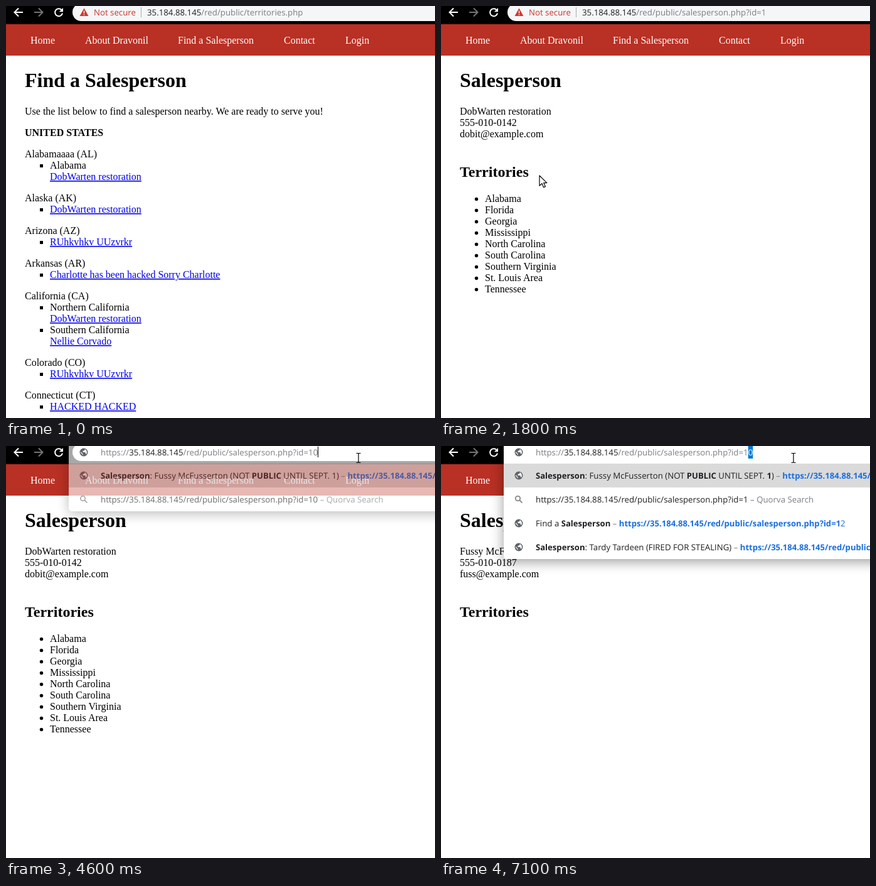
These frames come from a looping animation (684 px wide and 656 px high, 7.2 s). An HTML page:

```html
<!DOCTYPE html>
<html lang="en">
<head>
<meta charset="utf-8">
<title>Salesperson pages</title>
<style>
  html, body { margin: 0; width: 100%; height: 100%; overflow: hidden; background: #fff; }
  svg { display: block; width: 684px; height: 656px; }
  text { white-space: pre; }
  .page text { font: 16px "Liberation Serif", "Times New Roman", serif; }
  .page .h1 { font-size: 32px; font-weight: bold; }
  .page .h2 { font-size: 24px; font-weight: bold; }
  .page .b { font-weight: bold; }
  .page .link { fill: #00e; text-decoration: underline; }
  .ui text { font: 13.25px "Open Sans", "Noto Sans", sans-serif; fill: #202124; text-rendering: geometricPrecision; }
  .ui .b { font-size: 13.1px; font-weight: 700; }
  .ui .dim { fill: #7b7f84; }
  .ui .url { fill: #1a6fe0; }
  .ui .red { fill: #c8372d; }
  .ui .sel { fill: #fff; }
  #popup .panel { filter: drop-shadow(0 4px 10px rgba(0,0,0,.4)); }
</style>
</head>
<body>
<svg id="stage" viewBox="0 0 684 656"></svg>
<script>
const LOOP = 7200;
const HOST = "35.184.88.145";
const DIR = "/red/public/";
const SELLER = "DobWarten restoration";
const HIDDEN = "Fussy McFusserton";
const stage = document.getElementById("stage");

const text = (x, y, body, cls = "") => `<text x="${x}" y="${y}" class="${cls}">${body}</text>`;
const span = (cls, body) => `<tspan class="${cls}">${body}</tspan>`;
const group = (id, body, cls = "") => `<g id="${id}" class="${cls}">${body}</g>`;

// Page contents
const states = [
  ["Alabamaaaa (AL)", ["Alabama", SELLER]],
  ["Alaska (AK)", ["", SELLER]],
  ["Arizona (AZ)", ["", "RUhkvhkv UUzvrkr"]],
  ["Arkansas (AR)", ["", "Charlotte has been hacked Sorry Charlotte"]],
  ["California (CA)", ["Northern California", SELLER], ["Southern California", "Nellie Corvado"]],
  ["Colorado (CO)", ["", "RUhkvhkv UUzvrkr"]],
  ["Connecticut (CT)", ["", "HACKED HACKED"]]
];

const areas = ["Alabama", "Florida", "Georgia", "Mississippi", "North Carolina",
  "South Carolina", "Southern Virginia", "St. Louis Area", "Tennessee"];

function territories() {
  let out = text(30, 129, "Find a Salesperson", "h1")
    + text(30, 173, "Use the list below to find a salesperson nearby. We are ready to serve you!")
    + text(30, 207, "UNITED STATES", "b");
  let y = 241;
  for (const [state, ...regions] of states) {
    out += text(30, y, state);
    for (const [region, person] of regions) {
      y += 18;
      out += `<rect x="54" y="${y - 7}" width="5" height="5"/>`;
      if (region) {
        out += text(70, y, region);
        y += 18;
      }
      out += text(70, y, person, "link");
    }
    y += 34;
  }
  return out;
}

function profile(name, phone, mail, list) {
  return text(30, 129, "Salesperson", "h1")
    + [name, phone, mail].map((line, i) => text(30, 173 + 18 * i, line)).join("")
    + text(30, 272, "Territories", "h2")
    + list.map((area, i) => {
        const y = 312 + 18 * i;
        return `<circle cx="56.5" cy="${y - 4.5}" r="2.7"/>` + text(70, y, area);
      }).join("");
}

const nav = `<rect y="29" width="684" height="50" fill="#b93024"/><g fill="#fff">`
  + [[39, "Home"], [126, "About Dravonil"], [274, "Find a Salesperson"], [443, "Contact"], [541, "Login"]]
      .map(([x, label]) => text(x, 60, label)).join("") + "</g>";

// Browser parts
const arrow = (x, dir, color) =>
  `<path d="M${x + 7 * dir} 10H${x - 6.5 * dir}M${x} 3.5L${x - 6.5 * dir} 10L${x} 16.5"
    fill="none" stroke="${color}" stroke-width="2"/>`;

const toolbar = `<rect width="684" height="29"/>` + arrow(20, 1, "#fff") + arrow(52, -1, "#737373")
  + `<path d="M88.6 6.2A6 6 0 1 0 90 11.6" fill="none" stroke="#fff" stroke-width="2"/>
     <path d="M91 3V9.2H84.8Z" fill="#fff"/>`;

const globe = y => `<g transform="translate(124 ${y})"><circle r="6.5" fill="#5f6368"/>
  <path d="M-5-1L-1.4 2.4V5.2C-4-.1-5.6 2-5-1ZM1.5-5V-3.4L-1.5-2V0H2.2L3 2.6H4.6C5.7 0 5-3.6 1.5-5Z"
    fill="#f1f3f4"/></g>`;

const lens = `<g fill="none" stroke="#777" stroke-width="1.6"><circle cx="122.5" cy="83.5" r="3.7"/>
  <path d="M125.4 86.4L129.5 90.5"/></g>`;

const security = `<path d="M124.5 3.5L131.5 16H117.5Z" fill="#cf3a2f"/>
  <path d="M124.5 7.5V11.8M124.5 13V14.6" stroke="#fff" stroke-width="1.4"/>`
  + text(140, 15, "Not secure", "red") + `<path d="M215.5 2V18" stroke="#aaa"/>`;

const pill = `<rect id="field" x="106" y="-4" width="640" height="28" rx="14"/>`;

const fullUrl = page => `https://${HOST}${DIR}${page}`;
const sellerUrl = span("b url", fullUrl("salesperson.php?id=1"));
const dash = span("dim", " – ");

function rows(short) {
  const one = short ? span("b", "1") : "1";
  const first = globe(47)
    + text(151, 52, span("b", "Salesperson") + `: ${HIDDEN} (NOT ` + span("b", "PUBLIC") + ` UNTIL SEPT. ${one})`
      + dash + span("b url", fullUrl("salesperson.php?id=10")));
  const search = lens
    + text(151, 90, fullUrl(`salesperson.php?id=${short ? "1" : "10"}`) + dash + span("dim", "Quorva Search"));
  if (!short) return first + search;
  return first + search + globe(123) + globe(161)
    + text(151, 128, "Find a " + span("b", "Salesperson") + dash + sellerUrl + span("url", "2"))
    + text(151, 166, span("b", "Salesperson") + ": Tardy Tardeen (FIRED FOR STEALING)" + dash + sellerUrl);
}

const cursors = group("pointer", `<path d="M0 0V16.2L3.9 12.6L6.6 18.8L9.4 17.6L6.7 11.6H11.8Z"
    fill="#fff" stroke="#000" stroke-width="1.2" stroke-linejoin="round"/>`)
  + group("beam", `<path d="M-3.5-7.5H-1L0-6.5L1-7.5H3.5M0-6.5V6.5M-3.5 7.5H-1L0 6.5L1 7.5H3.5"
    fill="none" stroke="#000" stroke-width="1.2"/>`);

stage.innerHTML = `<rect width="684" height="656" fill="#fff"/>`
  + group("content",
      group("list", territories())
      + group("seller", profile(SELLER, "555-010-0142", "dobit@example.com", areas))
      + group("hidden", profile(`${HIDDEN} (NOT PUBLIC UNTIL SEPT. 1)`, "555-010-0187", "fuss@example.com", []))
      + nav, "page")
  + group("browser", toolbar
      + group("popup", `<rect class="panel" x="100" y="-10" rx="5" width="620" fill="#fff"/>
          <rect x="100" y="28" width="584" height="38" fill="#dadada"/>`
          + group("two", rows(false)) + group("four", rows(true)))
      + pill + group("secure", security) + group("editing", globe(10))
      + `<rect id="mark" y="-1" width="7.6" height="21" fill="#0078d7"/>
         <text id="address" y="15"></text>
         <path id="caret" d="M0 1V18" stroke="#000"/>`, "ui")
  + cursors;

const el = {};
stage.querySelectorAll("[id]").forEach(node => el[node.id] = node);
const panel = stage.querySelector(".panel");
const show = (node, on) => node.setAttribute("display", on ? "inline" : "none");
const place = (node, x, y = 0) => node.setAttribute("transform", `translate(${x} ${y})`);

// time, x, y of the mouse
const track = [[200, 684, 640], [600, 193, 253], [900, 157, 270], [1800, 157, 270],
  [2100, 290, 160], [2500, 563, 13], [2700, 563, 13], [3000, 562, 19], [LOOP, 562, 19]];

function mouseAt(t) {
  const i = track.findIndex(key => key[0] > t);
  const [t0, x0, y0] = track[i - 1], [t1, x1, y1] = track[i];
  const k = (t - t0) / (t1 - t0);
  return [x0 + (x1 - x0) * k, y0 + (y1 - y0) * k];
}

let lastAddress = "";
function setAddress(page, full, chosen) {
  const x = full ? 151 : 225;
  const html = (full ? span("dim", "https://") : "") + HOST + span("dim", DIR + page) + span("sel", chosen);
  if (html !== lastAddress) el.address.innerHTML = lastAddress = html;
  el.address.setAttribute("x", x);
  return x + el.address.getComputedTextLength();
}

function draw(time) {
  const t = Math.floor(time / 100) * 100;
  const page = t < 1500 ? "list" : t < 5200 ? "seller" : "hidden";
  for (const id of ["list", "seller", "hidden"]) show(el[id], id === page);

  const typed = t >= 4400 && t < 5200;
  const completed = t >= 6300;
  const edit = typed || completed;
  const focus = t >= 2600 && t < 5200 || t >= 5700;
  const fade = t < 4600 || completed ? 1 : t === 4600 ? .66 : t === 4700 ? .25 : 0;

  show(el.popup, edit && fade > 0);
  el.popup.setAttribute("opacity", fade);
  panel.setAttribute("height", completed ? 190 : 114);
  show(el.two, typed);
  show(el.four, completed);
  show(el.secure, !edit);
  show(el.editing, edit);
  el.field.setAttribute("fill", focus ? "#fff" : "#f5f6f7");
  el.field.setAttribute("stroke", focus && !edit ? "#a9c7f5" : "none");

  const file = page === "list" ? "territories.php"
    : "salesperson.php?id=1" + (typed || page === "hidden" && !completed ? "0" : "");
  const end = setAddress(file, edit, completed ? "0" : "");
  show(el.mark, completed);
  place(el.mark, end - 7.5);

  const blink = t < 4400 ? (t - 2600) % 1000 < 500 : t < 4700 || t >= 5700 && (t - 5700) % 1000 < 500;
  show(el.caret, focus && !completed && blink);
  place(el.caret, Math.round(end) + .5);

  const beam = t >= 2500;
  show(el.pointer, t >= 200 && !beam);
  show(el.beam, beam);
  if (t >= 200) place(beam ? el.beam : el.pointer, ...mouseAt(t));
}

const start = performance.now();
function tick() {
  draw((performance.now() - start) % LOOP);
  requestAnimationFrame(tick);
}
tick();
</script>
</body>
</html>
```
